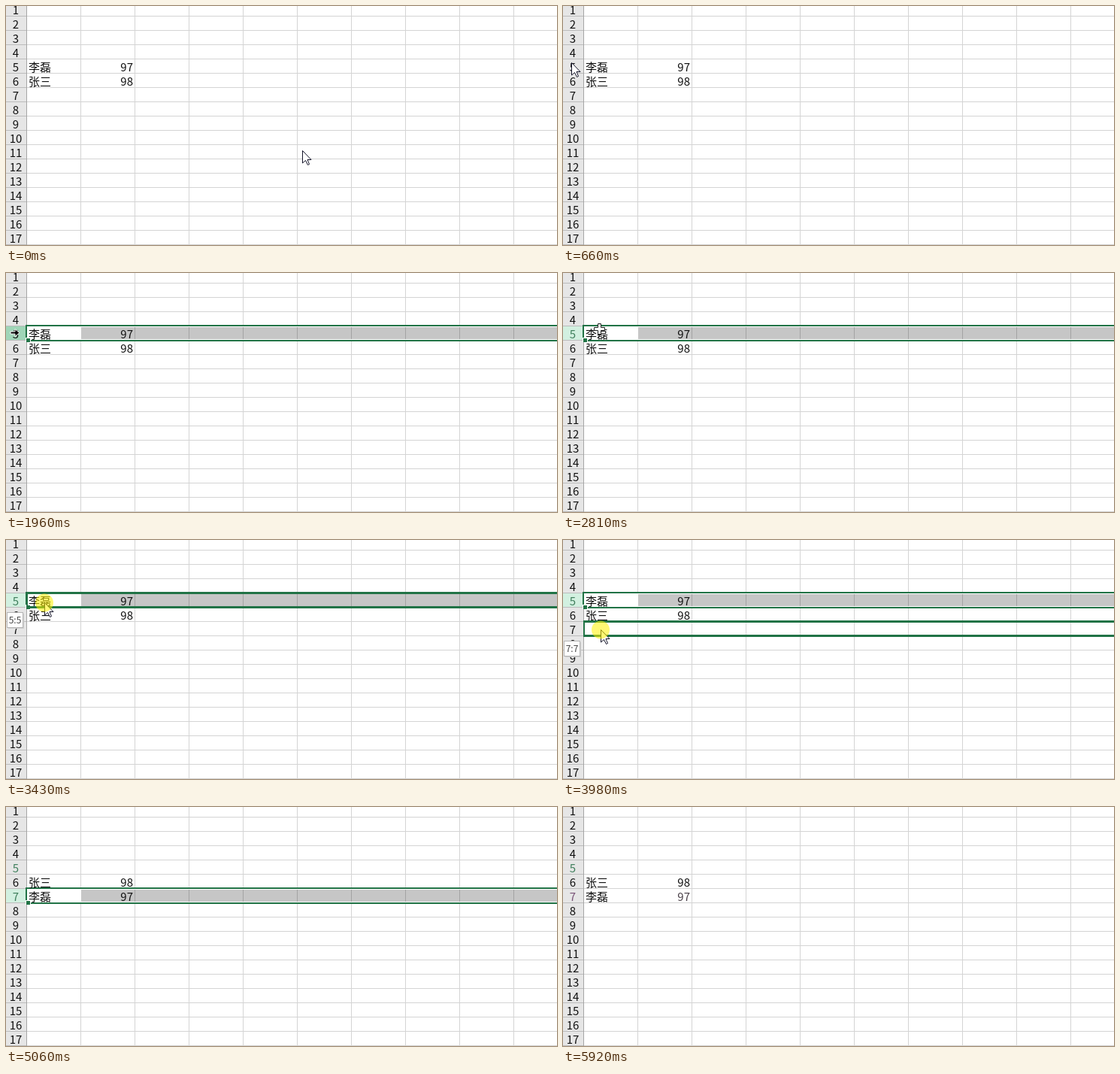
An HTML page with a canvas that plays this animation: 733x318 px, repeating every 5990 ms.

```html
<!DOCTYPE html>
<html lang="zh">
<meta charset="utf-8">
<style>
  html, body { margin: 0; width: 733px; height: 318px; overflow: hidden; background: #fff; }
  canvas { display: block; }
</style>
<canvas id="stage" width="733" height="318"></canvas>
<script>
const c = document.getElementById('stage').getContext('2d');
const W = 733, H = 318, LOOP = 5990, GREEN = '#217346';
const FONT = '"Noto Sans CJK SC", "Noto Sans CJK", sans-serif';

const rowTop = r => 13 + 19 * (r - 2);
const smooth = p => p * p * (3 - 2 * p);

function rect(color, x, y, w, h) {
  c.fillStyle = color;
  c.fillRect(x, y, w, h);
}

function text(s, x, y, align = 'left', color = '#111', size = 15) {
  c.font = size + 'px ' + FONT;
  c.textAlign = align;
  c.fillStyle = color;
  c.fillText(s, x, y);
}

function shape(points, fill, stroke, x, y) {
  c.beginPath();
  points.forEach(([px, py]) => c.lineTo(x + px, y + py));
  c.closePath();
  c.fillStyle = fill;
  c.fill();
  if (stroke) {
    c.strokeStyle = stroke;
    c.lineWidth = 1;
    c.stroke();
  }
}

// Pointers, each drawn around its hot spot
const POINTER = [[0, 0], [0, 16.5], [4, 13], [7, 19], [9, 18], [6.5, 12], [11.5, 12]];
const ROW_ARROW = [[-12, -1.5], [-6, -1.5], [-6, -5], [0, 0], [-6, 5], [-6, 1.5], [-12, 1.5]];

function crossPoints(long, thin) {
  const quarter = [[-thin, -long], [thin, -long], [thin, -thin]];
  return [0, 1, 2, 3].flatMap(k => quarter.map(([x, y]) => {
    for (let i = 0; i < k; i++) [x, y] = [-y, x];
    return [x, y];
  }));
}
const PLUS = crossPoints(7, 2);
const STEM = crossPoints(6, 0.5);

const pointers = {
  arrow: (x, y) => shape(POINTER, '#fff', '#15152a', x + 0.5, y + 0.5),
  row: (x, y) => shape(ROW_ARROW, '#000', '#fff', x, y + 0.5),
  plus: (x, y) => shape(PLUS, '#fff', '#222', x + 0.5, y + 0.5),
  move(x, y) {
    pointers.arrow(x, y);
    shape(STEM, '#000', null, x + 0.5, y + 0.5);
    for (const [dx, dy] of [[0, -1], [1, 0], [0, 1], [-1, 0]]) {
      const tip = [dx * 8, dy * 8];
      const side = s => [dx * 5 + dy * 3 * s, dy * 5 + dx * 3 * s];
      shape([tip, side(1), side(-1)], '#000', null, x + 0.5, y + 0.5);
    }
  }
};

// Pointer steps: time, kind, x, y, pressed
const steps = [[0, 'arrow', 394, 192]];

function glide(kind, t0, t1, n, from, to) {
  for (let i = 1; i <= n; i++) {
    const p = smooth(i / n);
    steps.push([t0 + (t1 - t0) * (i - 1) / (n - 1), kind,
      Math.round(from[0] + (to[0] - from[0]) * p),
      Math.round(from[1] + (to[1] - from[1]) * p)]);
  }
}

glide('arrow', 70, 660, 9, [394, 192], [11, 75]);
steps.push(
  [720, 'row', 13, 85], [890, 'row', 11, 72], [960, 'row', 10, 69],
  [1270, 'row', 11, 71], [1340, 'row', 12, 80], [1420, 'row', 12, 76],
  [1730, 'row', 16, 78], [1800, 'row', 18, 79, 1], [1960, 'row', 18, 79],
  [2440, 'row', 28, 79], [2500, 'plus', 44, 79],
  [2730, 'plus', 46, 76], [2800, 'plus', 48, 74], [2890, 'move', 48, 71],
  [3190, 'arrow', 48, 71, 1], [3360, 'arrow', 50, 76, 1], [3430, 'arrow', 51, 83, 1],
  [3520, 'arrow', 51, 91, 1], [3590, 'arrow', 51, 98, 1], [3660, 'arrow', 51, 104, 1],
  [3730, 'arrow', 50, 110, 1], [3830, 'arrow', 50, 115, 1], [3920, 'arrow', 50, 118, 1],
  [3980, 'arrow', 50, 119, 1], [4290, 'arrow', 50, 124, 1], [4440, 'arrow', 50, 124]
);
glide('plus', 4510, 4980, 7, [50, 124], [471, 264]);
steps.push([5060, null, 0, 0]);

function drawSheet(t) {
  const moved = t >= 4440, ended = t >= 5920;
  const selected = t >= 1800 && !ended ? (moved ? 7 : 5) : 0;
  const hovered = t >= 890 && t < 2440 ? 5 : 0;

  rect('#fff', 0, 0, W, H);
  rect('#e6e6e6', 0, 0, 27, H);
  if (selected) rect('#d2f0e0', 0, rowTop(selected) + 1, 27, 18);
  if (hovered) rect('#9fd5b7', 0, rowTop(hovered) + 1, 27, 18);

  for (let x = 99; x < W; x += 72) rect('#d4d4d4', x, 0, 1, H);
  for (let r = 2; r <= 18; r++) {
    rect('#d4d4d4', 28, rowTop(r), W, 1);
    rect('#bcbcbc', 0, rowTop(r), 27, 1);
  }
  rect('#a6a6a6', 27, 0, 1, H);

  if (selected) drawSelection(rowTop(selected));

  for (let r = 1; r <= 17; r++) {
    let color = '#111';
    if (r === selected && !hovered || r === 5 && moved) color = '#3f7f5c';
    if (r === 7 && ended) color = '#7a5478';
    text(r, 13, rowTop(r) + 17, 'center', color);
  }
  const entry = (r, name, score, color) => {
    text(name, 30, rowTop(r) + 17);
    text(score, 169, rowTop(r) + 17, 'right', color);
  };
  entry(moved ? 7 : 5, '李磊', 97, ended ? '#4a4048' : '#111');
  entry(6, '张三', 98);
}

function drawSelection(y) {
  rect('#fff', 28, y + 1, W, 18);
  rect('#c6c6c6', 100, y + 2, W, 16);
  for (let x = 171; x < W; x += 72) rect('#a3a3a3', x, y + 2, 1, 16);
  rect(GREEN, 27, y - 1, W, 2);
  rect(GREEN, 27, y + 19, W, 2);
  rect(GREEN, 26, y - 1, 2, 22);
  rect('#fff', 26, y + 16, 7, 6);
  rect(GREEN, 27, y + 17, 5, 5);
}

function drawDrag(t, y) {
  const target = t < 3590 ? 5 : t < 3980 ? 6 : 7;
  const top = rowTop(target);
  rect(GREEN, 27, top - 1, W, 3);
  rect(GREEN, 27, top + 18, W, 3);
  rect(GREEN, 27, top - 1, 2, 22);

  const label = t < 3590 ? 5 : t < 3920 ? 6 : 7;
  const tipY = t < 3520 ? y + 13 : t >= 3920 && t < 4290 ? 134 : y + 15;
  rect('#d0d0d0', 3, tipY + 2, 21, 20);
  rect('#b4b4b4', 1, tipY, 22, 21);
  rect('#fff', 2, tipY + 1, 20, 19);
  text(label + ':' + label, 12, tipY + 15, 'center', '#444', 12);
}

function draw(t) {
  const [, kind, x, y, pressed] = steps.findLast(s => s[0] <= t);
  drawSheet(t);
  if (t >= 3360 && t < 4440) drawDrag(t, y);
  if (kind) pointers[kind](x, y);
  if (pressed) {
    c.fillStyle = 'rgba(255, 242, 0, 0.55)';
    c.beginPath();
    c.arc(x, y + 0.5, 12, 0, 7);
    c.fill();
  }
}

const start = performance.now();
function frame() {
  draw((performance.now() - start) % LOOP);
  requestAnimationFrame(frame);
}
frame();
</script>
</html>
```
